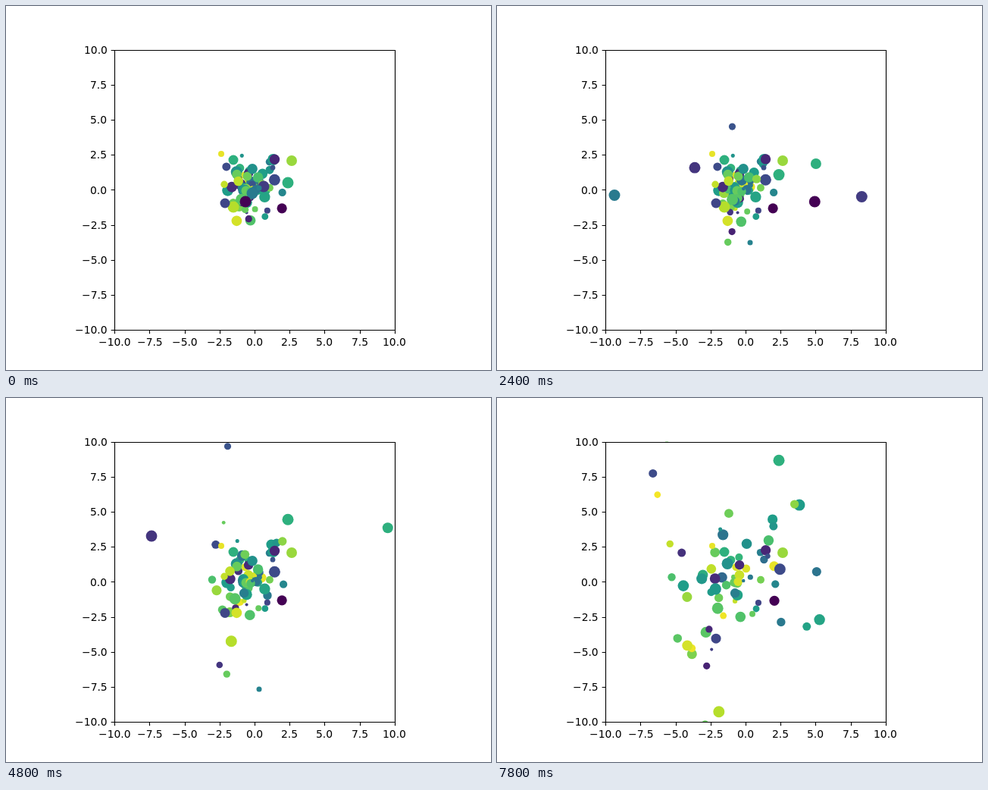
An HTML page with a canvas that plays this animation: 640 px wide and 480 px high, repeating every 8 s.

```html
<!DOCTYPE html>
<html lang="en">
<head>
<meta charset="utf-8">
<title>Scattering particles</title>
<style>
  html, body { margin: 0; width: 100%; height: 100%; overflow: hidden; background: #fff; }
  canvas { display: block; }
</style>
</head>
<body>
<canvas id="stage" width="640" height="480"></canvas>
<script>
const ctx = document.getElementById('stage').getContext('2d');
const STEP = 200, STEPS = 40;
const LEFT = 143.2, TOP = 57.6, SIZE = 369.6;
const UNIT = SIZE / 20, CX = LEFT + SIZE / 2, CY = TOP + SIZE / 2;

// A dot's colour is a position from 0 to 9 on this scale.
const SCALE = ['440154', '482878', '3e4989', '31688e', '26828e',
               '1f9e89', '35b779', '6ece58', 'b5de2b', 'fde725']
  .map(hex => hex.match(/../g).map(pair => parseInt(pair, 16)));

function scaleColor(pos) {
  const i = Math.min(8, Math.floor(pos));
  return `rgb(${SCALE[i].map((v, k) => Math.round(v + (SCALE[i + 1][k] - v) * (pos - i)))})`;
}

function seeded(seed) {
  return () => {
    seed = seed + 0x6d2b79f5 | 0;
    let t = Math.imul(seed ^ seed >>> 15, seed | 1);
    t ^= t + Math.imul(t ^ t >>> 7, t | 61);
    return ((t ^ t >>> 14) >>> 0) / 2 ** 32;
  };
}

const random = seeded(7);

// A normally spread cloud whose dots fly outwards one after another, mostly slowly.
function cloudDot() {
  const distance = Math.min(2.6, Math.sqrt(-2 * Math.log(1 - random()))) * UNIT;
  const angle = random() * 2 * Math.PI;
  const heading = angle + random() - .5;
  const speed = 9 * random() ** 3;
  return {
    x: CX + distance * Math.cos(angle),
    y: CY + distance * Math.sin(angle),
    r: .7 + 6.9 * Math.sqrt(random()),
    color: 9 * random(),
    start: 36 * random(),
    vx: speed * Math.cos(heading),
    vy: speed * Math.sin(heading)
  };
}

// The most conspicuous dots
const leaders = [
  { x: 284, y: 195, r: 4, color: 8.7 },
  { x: 300, y: 203, r: 6.5, color: 5.7 },
  { x: 377, y: 204, r: 7, color: 7.6 },
  { x: 372, y: 233, r: 7.5, color: 5.7, start: 10, vy: -5.2 },
  { x: 300, y: 265, r: 7.5, color: 8, start: 15, vx: -.3, vy: 6.2 },
  { x: 289, y: 260, r: 6.5, color: 1.9, start: 13.6, vy: 2.25 },
  { x: 325, y: 247, r: 7.5, color: 3.7, start: 2, vx: -17, vy: .25 },
  { x: 340, y: 238, r: 7.5, color: 1.6, start: 3, vx: 15.7, vy: 1.5 },
  { x: 316, y: 258, r: 7.5, color: 0, start: 5, vx: 14.75 },
  { x: 334, y: 240, r: 3.5, color: 4, vy: 6 }
];

const dots = [...Array.from({ length: 76 }, cloudDot), ...leaders];

function drawDot({ x, y, r, color, start = 0, vx = 0, vy = 0 }, step) {
  const moved = Math.max(0, step - start);
  ctx.fillStyle = scaleColor(color);
  ctx.beginPath();
  ctx.arc(x + vx * moved, y + vy * moved, r, 0, 2 * Math.PI);
  ctx.fill();
}

function drawAxes() {
  const snap = v => Math.round(v) + .5;
  const x0 = snap(LEFT), y0 = snap(TOP), x1 = snap(LEFT + SIZE), y1 = snap(TOP + SIZE);
  ctx.strokeStyle = ctx.fillStyle = '#000';
  ctx.lineWidth = 1.11;
  ctx.font = '13.89px "DejaVu Sans", sans-serif';
  ctx.beginPath();
  ctx.rect(x0, y0, x1 - x0, y1 - y0);
  for (let i = 0; i <= 8; i++) {
    const value = i * 2.5 - 10, offset = i * SIZE / 8;
    const label = (value < 0 ? '\u2212' : '') + Math.abs(value).toFixed(1);
    const width = ctx.measureText(label).width;
    const x = LEFT + offset, y = TOP + SIZE - offset;
    ctx.moveTo(snap(x), y1);
    ctx.lineTo(snap(x), y1 + 4.86);
    ctx.moveTo(x0, snap(y));
    ctx.lineTo(x0 - 4.86, snap(y));
    ctx.fillText(label, Math.round(x - width / 2), 448);
    ctx.fillText(label, Math.round(133.4 - width), Math.round(y + 5.2));
  }
  ctx.stroke();
}

function render(now) {
  const step = Math.floor(now / STEP) % STEPS;
  ctx.fillStyle = '#fff';
  ctx.fillRect(0, 0, 640, 480);
  ctx.save();
  ctx.beginPath();
  ctx.rect(LEFT, TOP, SIZE, SIZE);
  ctx.clip();
  dots.forEach(dot => drawDot(dot, step));
  ctx.restore();
  drawAxes();
}

const began = performance.now();
function tick() {
  render(performance.now() - began);
  requestAnimationFrame(tick);
}
tick();
</script>
</body>
</html>
```
